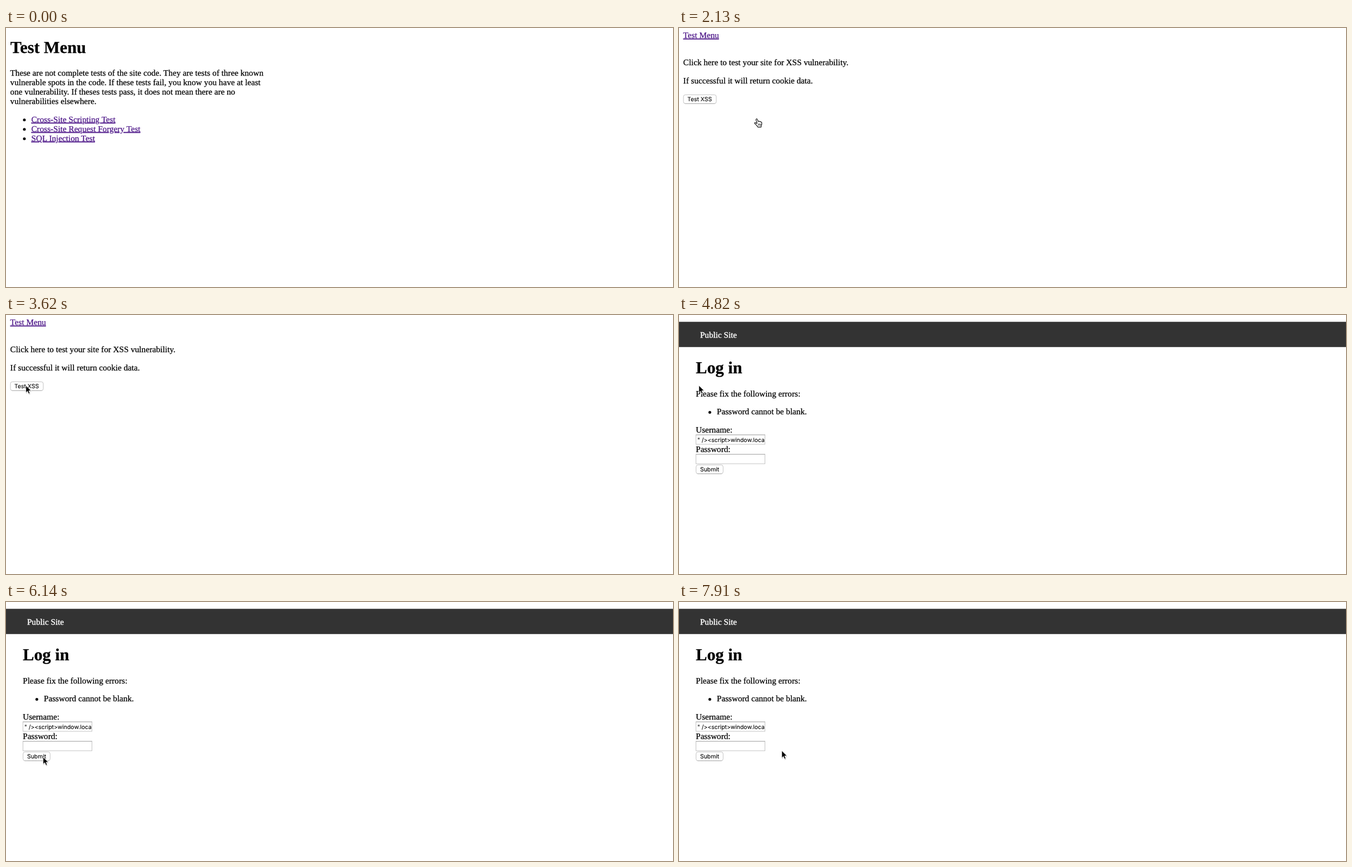
Write an HTML page that moves like this. It is 1199 px wide and 467 px high and loops after 8 s.

```html
<!DOCTYPE html>
<html lang="en">
<head>
<meta charset="utf-8">
<title>Test Menu</title>
<style>
  html, body { margin: 0; width: 100%; height: 100%; overflow: hidden; background: #fff; }
  svg { display: block; width: 100%; height: 100%; }
  text {
    font: 15.18px "Liberation Serif", Times, serif;
    text-rendering: geometricPrecision;
    white-space: pre;
    fill: currentColor;
    stroke: currentColor;
    stroke-width: .25;
  }
  .h1 { font-size: 30.3px; font-weight: bold; }
  .link { color: #4b1487; text-decoration: underline; text-decoration-skip-ink: none; }
  .bar { color: #fff; stroke-width: .4; }
  .ui { font: 10.4px Inter, Roboto, sans-serif; stroke-width: .1; }
  .box { fill: #fff; stroke: #c3c3c3; }
  .edge { fill: none; stroke: #a9a9a9; stroke-width: .8; }
  .down .box { fill: url(#blue); stroke: #2a70e0; }
  .down .edge { stroke: #1a50c0; }
  .down .ui { color: #fff; }
</style>
</head>
<body>
<svg viewBox="0 0 1199 467">
  <defs>
    <linearGradient id="blue" x2="0" y2="1">
      <stop stop-color="#6bb0fa"/>
      <stop offset="1" stop-color="#0c66f5"/>
    </linearGradient>
  </defs>

  <g class="page">
    <text class="h1" x="7.8" y="45">Test Menu</text>
    <text x="7.6" y="86.2">These are not complete tests of the site code. They are tests of three known</text>
    <text x="7.6" y="103.2">vulnerable spots in the code. If these tests fail, you know you have at least</text>
    <text x="7.6" y="120.2">one vulnerability. If theses tests pass, it does not mean there are no</text>
    <text x="7.6" y="137.2">vulnerabilities elsewhere.</text>
    <circle cx="33" cy="165.8" r="2.5"/>
    <circle cx="33" cy="182.8" r="2.5"/>
    <circle cx="33" cy="199.8" r="2.5"/>
    <text class="link" x="45.5" y="169.6">Cross-Site Scripting Test</text>
    <text class="link" x="45.5" y="186.6">Cross-Site Request Forgery Test</text>
    <text class="link" x="45.5" y="203.6">SQL Injection Test</text>
  </g>

  <g class="page">
    <text class="link" x="7.6" y="18">Test Menu</text>
    <text x="7.6" y="67.2">Click here to test your site for XSS vulnerability.</text>
    <text x="7.6" y="99.5">If successful it will return cookie data.</text>
    <g id="xss">
      <rect class="box" x="8" y="120.4" width="59" height="16" rx="3.6"/>
      <path class="edge" d="M10.5 136.4H64.5"/>
      <text class="ui" x="15" y="132">Test XSS</text>
    </g>
  </g>

  <g class="page">
    <rect y="12.3" width="1199" height="45.5" fill="#333"/>
    <text class="bar" x="37.9" y="41">Public Site</text>
    <text class="h1" x="30.2" y="105.3">Log in</text>
    <text x="30.2" y="147">Please fix the following errors:</text>
    <circle cx="55.4" cy="175.6" r="2.5"/>
    <text x="68" y="179.3">Password cannot be blank.</text>
    <text x="30.2" y="211.5">Username:</text>
    <rect class="box" x="30.5" y="216.1" width="124" height="17"/>
    <path class="edge" d="M30 216.1H155"/>
    <text class="ui" x="33" y="228.7">" /&gt;&lt;script&gt;window.loca</text>
    <text x="30.2" y="246.7">Password:</text>
    <rect class="box" x="30.5" y="251.2" width="124" height="17"/>
    <path class="edge" d="M30 251.2H155"/>
    <g id="submit">
      <rect class="box" x="30.7" y="270.3" width="48.6" height="16" rx="3.6"/>
      <path class="edge" d="M33.2 286.3H76.8"/>
      <text class="ui" x="38" y="282">Submit</text>
    </g>
  </g>

  <g id="arrow">
    <path d="M.5 1.5V15L3.6 12L5.6 16.8L8 15.8L6 11.2H10.2Z" opacity=".22"/>
    <path d="M0 0V13.2L3 10.4L5 15.2L7.4 14.2L5.4 9.6H9.5Z" stroke="#fff" stroke-width=".9"/>
  </g>
  <g id="hand" fill="#fff" stroke="#000" stroke-width="1.1" stroke-linejoin="round" stroke-linecap="round">
    <path d="M5.4 8.6L3.5 3.2Q3 1.2 4.3 .8Q5.7 .6 6.2 2.3L7.3 5.6Q8.6 4.4 9.7 5.8Q11.2 5 12 6.5Q13.6 6.2 13.8 8Q14.2 10.6 12.7 13V15.6H6.6Q5.6 13.4 3.4 11.4Q.4 9 .9 8Q2 6.8 4.5 9.2Z"/>
    <path d="M7.6 9.8V12.6M9.5 9.8V12.6M11.4 9.8V12.6" stroke-width=".8"/>
  </g>
</svg>
<script>
const LOOP = 8000, STEP = 145;
const $ = id => document.getElementById(id);
const pages = [...document.querySelectorAll('.page')];
const arrow = $('arrow'), hand = $('hand');

// Each move: start time, then one pointer position per step
const moves = [
  [500, [247, 323], [200, 262], [164, 212], [130, 172], [135, 163]],
  [2730, [110, 146], [62, 133], [34, 128], [35.7, 127]],
  [5120, [37, 146], [50, 190], [72, 243], [90, 285], [97, 304], [88, 299], [74, 287], [66.7, 279.3]],
  [6290, [78, 288], [89, 293], [80, 280], [62, 262], [48, 252], [52, 266], [60, 279]],
  [7764, [238, 273], [184.7, 268]]
];

const within = (t, a, b) => t >= a && t < b;

function pointer(t) {
  const move = moves.filter(m => t >= m[0]).pop();
  if (!move) return null;
  const i = Math.floor((t - move[0]) / STEP) + 1;
  return move[Math.min(i, move.length - 1)];
}

function place(el, pos, visible) {
  el.style.display = visible ? '' : 'none';
  if (visible) el.setAttribute('transform', `translate(${pos})`);
}

function draw(t) {
  const page = t < 2130 ? 0 : t < 4820 ? 1 : 2;
  pages.forEach((p, i) => p.style.display = i === page ? '' : 'none');
  $('xss').classList.toggle('down', within(t, 3470, 3620));
  $('submit').classList.toggle('down', within(t, 7470, 7620));
  const pos = pointer(t);
  const linked = within(t, 500 + 3 * STEP, 2730);
  place(hand, pos, pos && linked);
  place(arrow, pos, pos && !linked);
}

const start = performance.now();
function tick() {
  draw((performance.now() - start) % LOOP);
  requestAnimationFrame(tick);
}
draw(0);
tick();
</script>
</body>
</html>
```
